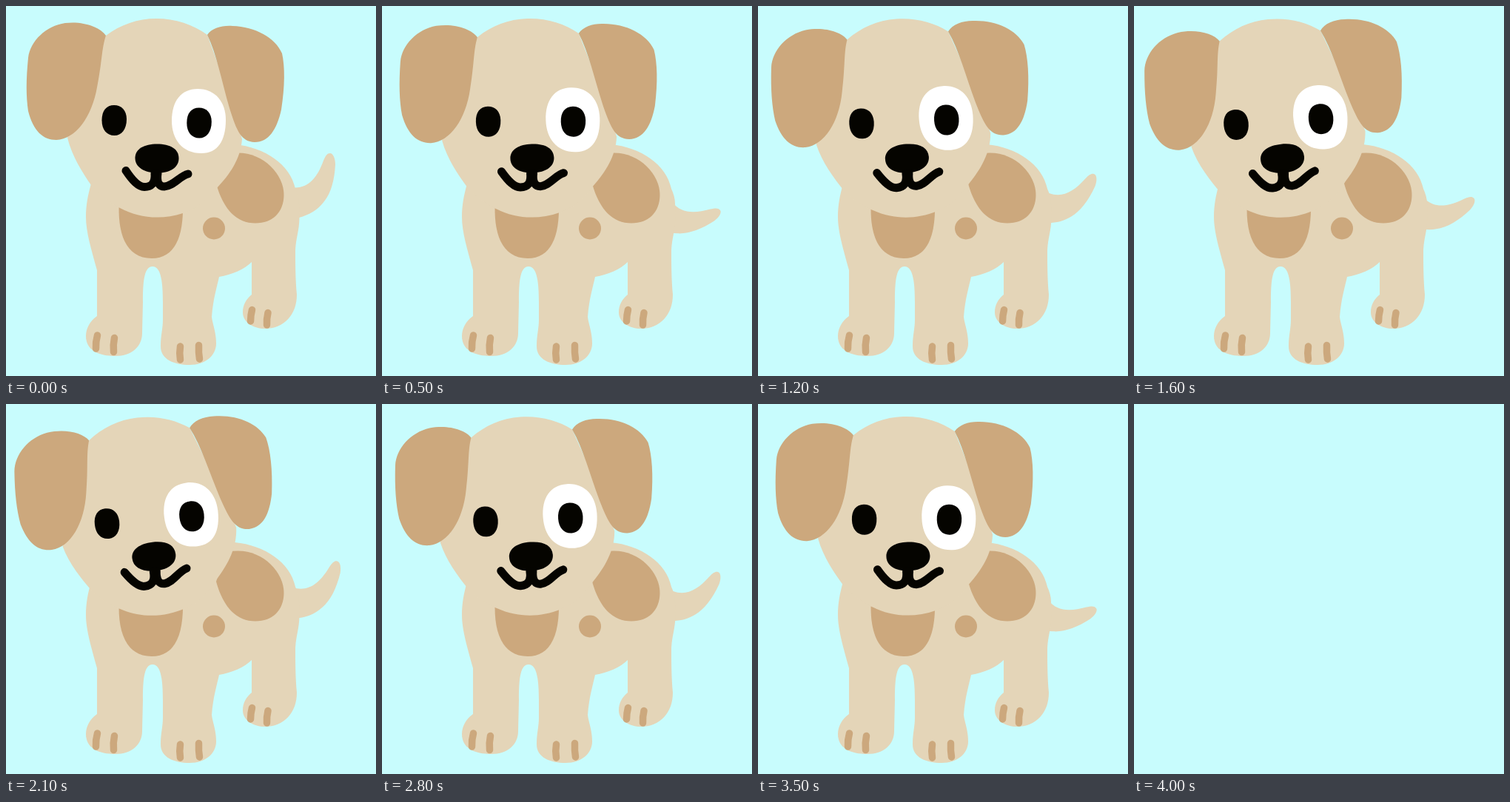
An HTML page that plays this animation: 500 px wide and 500 px high, repeating every 4100 ms.

```html
<!DOCTYPE html>
<html lang="en">
<head>
<meta charset="utf-8">
<title>Puppy</title>
<style>
  html, body { margin: 0; width: 100%; height: 100%; overflow: hidden; background: #c8fcfd; }
  svg { display: block; width: 100vw; height: 100vh; }
  .fur { fill: #e4d5b8; }
  .patch { fill: #cca87d; }
  .ink { fill: #050400; }
  .toes { fill: none; stroke: #cca87d; stroke-width: 9.5; stroke-linecap: round; }
  .mouth { fill: none; stroke: #050400; stroke-width: 11; stroke-linecap: round; }
</style>
</head>
<body>
<svg viewBox="0 0 500 500">
  <g id="dog">
    <path id="tail" class="fur" d="M378 246 L391 245.5 C410 245 421 231 429 209 C432 202 434 199 438 199
      C442 199 445 206 445 214 C444 235 439 253 430 264 C421 276 410 282 396 286 L380 287 Z"/>

    <path class="fur" d="M290 186 L309 187 C350 191 384 214 391 247 C394 254 396 260 396 267 L396.500 287
      C396 305 392 312 391 330 C391 345 391 370 393 390 C393 418 375 436 350 436
      C335 436 320 428 320 414 C320 403 325 396 332 390 L332 346
      C322 356 305 363 288 366 C285 380 280 395 278 420 C279 430 284 440 284 456
      C284 472 270 485 248 485 C228 485 209 478 209 460 C209 445 212 436 212 424 L212 400
      C212 375 210 352 198 352 C186 352 185 375 185 400 L184 442 C184 460 170 473 148 473
      C125 473 108 465 108 446 C108 436 113 426 123 419 L123 357
      C115 328 108 305 108 285 C108 268 111 255 115 240 Z"/>

    <g class="patch">
      <path d="M153 262 C150 306 161 341 197 341 C228 341 240 312 239 268 Z"/>
      <path d="M296 199 L313 198.500 C347 198 376 227 375.500 256 C375 279 360 293.500 337 293.500 C312 293.500 294 276 284 240 Z"/>
      <circle cx="281" cy="300.500" r="15"/>
    </g>
    <path class="toes" d="M123.500 445 Q121 454 121.500 463 M146.500 448.500 Q144.500 458 145.500 467.500
      M235.500 460 Q234 469 235.500 478 M260.500 458.500 Q260 468 261.500 477
      M332.500 410.500 Q330.500 418 330.500 426 M354 414.500 Q352 423 352.500 431"/>

    <g id="head">
      <path class="fur" d="M135 40 C155 25 178 17 203 17 C229 17 253 25 272 39 L305 130
        L319 180 C317 207 302 228 285 246 C272 263 257 275 239 280 C209 290 178 286 154 273
        C139 266 127 255 115 242 C104 226 89 203 83 178 L100 110 Z"/>
      <g class="patch">
        <path d="M135 40 C128 29 105 20 80 23 C54 27 33 47 30 70 C27 100 27 122 30 142
          C37 169 50 181 68 181 C94 180 116 150 123 110 C130 75 129 58 135 40 Z"/>
        <path d="M272 39 C278 30 292 26 306 27 C337 28 364 43 373 64 C377 82 377 108 372 140
          C366 167 355 184 336 184 C318 183 312 170 302 138 C291 100 285 66 272 39 Z"/>
      </g>
      <path fill="#fff" d="M224 155 C224 128 237 112 259 112 C283 112 297 130 297 154
        C297 182 286 199 264 199 C238 199 224 180 224 155 Z"/>
      <g class="ink">
        <path id="eye" d="M129.500 154.500 C129.500 141 136 134 146 134 C156 134 163 141 163 153
          C163 167 156 175 146.500 175 C136 175 129.500 167 129.500 154.500 Z"/>
        <use href="#eye" x="114.800" y="3.500"/>
        <path d="M174.500 205.500 C174.500 193 187 186.500 204 186.500 C222 186.500 233.500 193 233.500 206
          C233.500 218 222 225.500 205 225.500 C187 225.500 174.500 218 174.500 205.500 Z"/>
      </g>
      <path class="mouth" d="M162 222.500 C171 236 179 244.500 187 244.500 C196 244.500 202 240 201 226
        M205 226 C203 240 208 244 214 244 C226 243.500 235 229.500 246 227"/>
    </g>
  </g>
</svg>
<script>
  const LOOP = 4100, SWAY = 4000, WAG = 1000, STEP = 100;
  const [dog, head, tail] = ["dog", "head", "tail"].map(id => document.getElementById(id));

  // Triangle wave: 0 at the start, 1 halfway through the period
  const swing = (t, period) => 1 - Math.abs(1 - 2 * (t % period) / period);

  const turn = (part, angle, x, y) =>
    part.setAttribute("transform", `rotate(${angle} ${x} ${y})`);

  function draw(now) {
    const t = Math.floor(now % LOOP / STEP) * STEP;
    dog.style.visibility = t < SWAY ? "visible" : "hidden";
    turn(head, -7 * swing(t, SWAY), 203, 241);
    turn(tail, 54.5 * swing(t, WAG), 372.7, 256);
  }

  let start;
  function tick(now) {
    start ??= now;
    draw(now - start);
    requestAnimationFrame(tick);
  }
  draw(0);
  requestAnimationFrame(tick);
</script>
</body>
</html>
```
